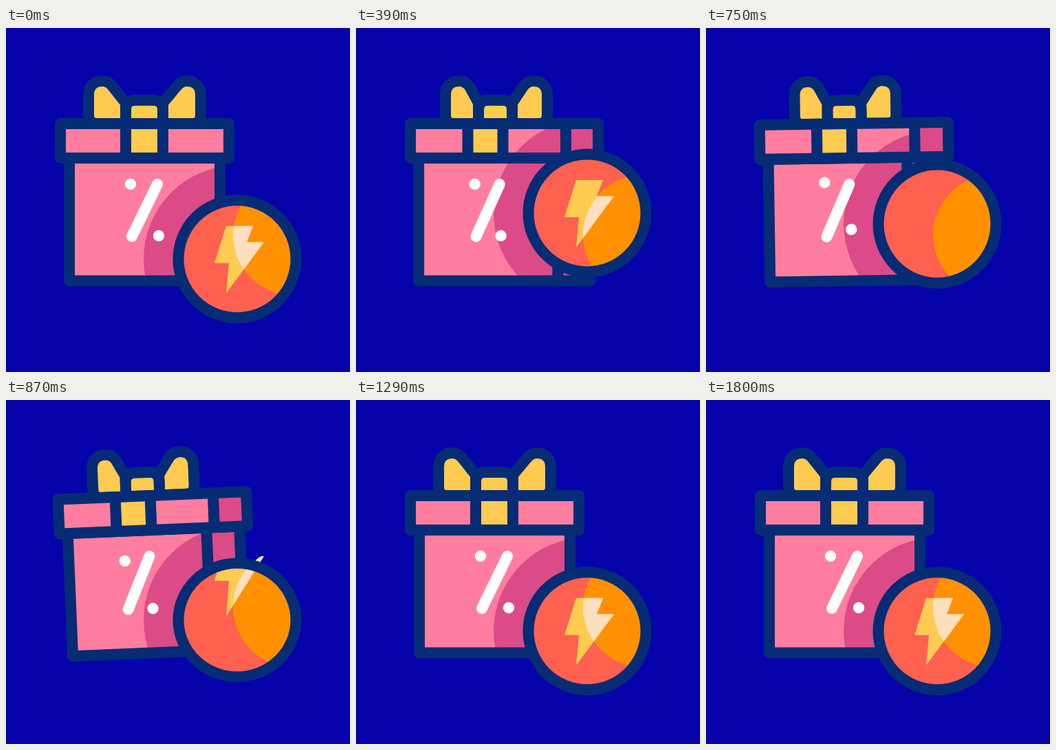
Animation of 500 by 500 pixels, one loop 1830 ms. Source, as an HTML page with a canvas:

```html
<!DOCTYPE html>
<html lang="en">
<head>
<meta charset="utf-8">
<title>Gift offer</title>
<style>
  html, body { margin: 0; width: 100%; height: 100%; overflow: hidden; background: #0603ab; }
  canvas { display: block; width: 500px; height: 500px; }
</style>
</head>
<body>
<canvas id="stage" width="500" height="500"></canvas>
<script>
const ctx = document.getElementById('stage').getContext('2d');
const LOOP = 1830;
const BG = '#0603ab', NAVY = '#052c75', PINK = '#ff7e9f', SHADE = '#db4b87', YELLOW = '#ffcb50',
      RED = '#ff6150', ORANGE = '#ff9100', CREAM = '#ffdfbe', WHITE = '#ffffff';

// Each track is a list of [time in ms, value].
const TRACKS = {
  turn:  [[0, 0], [240, .68], [390, 1], [630, 1.04], [870, 1.03], [1000, .55], [1140, 0]],
  tilt:  [[500, 0], [620, 2.85], [835, -2.75], [870, -2.4], [980, 0]],
  lift:  [[120, 0], [240, -4.5], [390, -66.5], [520, -94], [630, -84], [870, -16.2], [990, 0]],
  squash:[[0, 1], [190, .95], [240, .957], [390, 1], [600, 1.045], [630, 1.045], [870, .965], [930, .96], [1110, 1]],
  drop:  [[400, 0], [630, 116], [720, 195]],
  enter: [[720, -200], [870, -64.5], [990, 0]],
  pull:  [[420, 1], [630, 1.07], [800, 1.22], [870, 1.22], [1000, 1]],
  dotA:  [[460, 0], [620, -14], [860, 5.5], [980, 0]],
  dotB:  [[520, 0], [670, -13], [870, 1], [920, 4], [1030, 0]]
};

const BOLT = [[-16, -48], [23, -48], [14, -24.5], [39, -24.5], [-16, 50], [-12, 6], [-33, 6]];

// Smooth curve through the keys without overshoot.
function value(keys, t) {
  const last = keys.length - 1;
  if (t <= keys[0][0]) return keys[0][1];
  if (t >= keys[last][0]) return keys[last][1];
  const slope = i => (keys[i + 1][1] - keys[i][1]) / (keys[i + 1][0] - keys[i][0]);
  const tangent = i => {
    if (i === 0 || i === last) return 0;
    const a = slope(i - 1), b = slope(i);
    return a * b <= 0 ? 0 : 2 * a * b / (a + b);
  };
  let i = 0;
  while (t > keys[i + 1][0]) i++;
  const [t0, v0] = keys[i], [t1, v1] = keys[i + 1];
  const d = t1 - t0, s = (t - t0) / d, r = 1 - s;
  return v0 * (1 + 2 * s) * r * r + tangent(i) * d * s * r * r
       + v1 * s * s * (3 - 2 * s) - tangent(i + 1) * d * s * s * r;
}

function box(x0, y0, x1, y1, fill) {
  ctx.fillStyle = fill;
  ctx.fillRect(x0, y0, x1 - x0, y1 - y0);
}

function line(x0, y0, x1, y1, color = NAVY) {
  ctx.strokeStyle = color;
  ctx.beginPath();
  ctx.moveTo(x0, y0);
  ctx.lineTo(x1, y1);
  ctx.stroke();
}

function disc(x, y, r, fill) {
  ctx.beginPath();
  ctx.arc(x, y, r, 0, 7);
  ctx.fillStyle = fill;
  ctx.fill();
}

function outline() {
  ctx.fillStyle = YELLOW;
  ctx.strokeStyle = NAVY;
  ctx.fill();
  ctx.stroke();
}

// One loop of the bow; dir is 1 for the left loop, -1 for the right one.
function bowLoop(edge, inner, dir) {
  const at = d => edge + dir * d;
  ctx.beginPath();
  ctx.moveTo(inner, 139);
  ctx.lineTo(at(12), 139);
  ctx.quadraticCurveTo(edge, 139, edge, 126);
  ctx.lineTo(edge, 97);
  ctx.bezierCurveTo(edge, 84, at(9), 77, at(20), 77);
  ctx.quadraticCurveTo(at(29), 77, at(35), 85);
  ctx.lineTo(inner, 109);
  ctx.closePath();
  outline();
}

function bow(u) {
  const left = 174 + 4 * u, right = 228 - u;
  bowLoop(120 + 10 * u, left, 1);
  bowLoop(283 - 5 * u, right, -1);
  ctx.beginPath();
  ctx.moveTo(left, 139);
  ctx.lineTo(left, 119);
  ctx.quadraticCurveTo(left, 105, left + 14, 105);
  ctx.lineTo(right - 14, 105);
  ctx.quadraticCurveTo(right, 105, right, 119);
  ctx.lineTo(right, 139);
  ctx.closePath();
  outline();
}

function gift(u, tilt, dotA, dotB, ballY) {
  const bodyL = 92 - .9 * u, bodyM = 311 - 17.6 * u, bodyR = 311 + 29 * u;
  const lidM = 324 - 19 * u, lidR = 324 + 28 * u;
  const ribL = 174 - 11.5 * u, ribR = 228 - 14.5 * u;
  const place = () => {
    ctx.translate(210, 225);
    ctx.rotate(tilt * Math.PI / 180);
    ctx.translate(-210, -225);
  };
  const shaded = (x0, y0, x1, y1) => {
    box(x0, y0, x1, y1, PINK);
    ctx.save();
    ctx.beginPath();
    ctx.rect(x0, y0, x1 - x0, y1 - y0);
    ctx.clip();
    ctx.setTransform(1, 0, 0, 1, 0, 0);
    disc(336, ballY, 136, SHADE);
    ctx.restore();
  };
  const frame = (x0, y0, x1, y1) => {
    ctx.strokeStyle = NAVY;
    ctx.strokeRect(x0, y0, x1 - x0, y1 - y0);
  };

  ctx.save();
  place();
  ctx.lineWidth = 16;
  ctx.lineJoin = ctx.lineCap = 'round';

  bow(u);

  shaded(bodyL, 189, bodyM, 367.5);
  box(bodyM, 189, bodyR, 367.5, SHADE);
  line(bodyM, 189, bodyM, 367.5);
  frame(bodyL, 189, bodyR, 367.5);

  shaded(79, 139, lidM, 189);
  box(lidM, 139, lidR, 189, SHADE);
  box(ribL, 139, ribR, 189, YELLOW);
  for (const x of [ribL, ribR, lidM]) line(x, 139, x, 189);
  frame(79, 139, lidR, 189);

  const face = x => x - 8.3 * u - (x - 181) * .075 * u;
  line(face(220), 227, face(183), 303, WHITE);
  disc(face(181), 227 + dotA, 8.2, WHITE);
  disc(face(222), 302 + dotB, 8.2, WHITE);
  ctx.restore();
}

function bolt(y, scale, fill) {
  ctx.beginPath();
  for (const [px, py] of BOLT) ctx.lineTo(336 + px, y + py * scale);
  ctx.closePath();
  ctx.fillStyle = fill;
  ctx.fill();
}

function ball(y, squash, boltY, boltScale) {
  const ring = () => {
    ctx.beginPath();
    ctx.ellipse(336, y, 85.5, 85.5 * squash, 0, 0, 7);
  };
  // The highlight stays put while the ball passes under it.
  const glow = () => {
    ctx.beginPath();
    ctx.arc(417.5, 301, 87.5, 0, 7);
  };

  ctx.save();
  ring();
  ctx.clip();
  box(240, 100, 440, 450, RED);
  glow();
  ctx.fillStyle = ORANGE;
  ctx.fill();
  bolt(boltY, boltScale, YELLOW);
  ctx.restore();

  ctx.save();
  glow();
  ctx.clip();
  bolt(boltY, boltScale, CREAM);
  ctx.restore();

  ctx.save();
  ctx.translate(336, y);
  ctx.scale(1, squash);
  ctx.beginPath();
  ctx.arc(0, 0, 85.5, 0, 7);
  ctx.lineWidth = 16;
  ctx.strokeStyle = NAVY;
  ctx.stroke();
  ctx.restore();
}

function draw(t) {
  const get = name => value(TRACKS[name], t);
  const y = 335.7 + get('lift'), squash = get('squash');
  const slide = t < 720 ? get('drop') : get('enter');
  box(0, 0, 500, 500, BG);
  gift(get('turn'), get('tilt'), get('dotA'), get('dotB'), y);
  ball(y, squash, y + slide, squash * get('pull'));
}

const start = performance.now();
function tick() {
  draw((performance.now() - start) % LOOP);
  requestAnimationFrame(tick);
}
tick();
</script>
</body>
</html>
```
